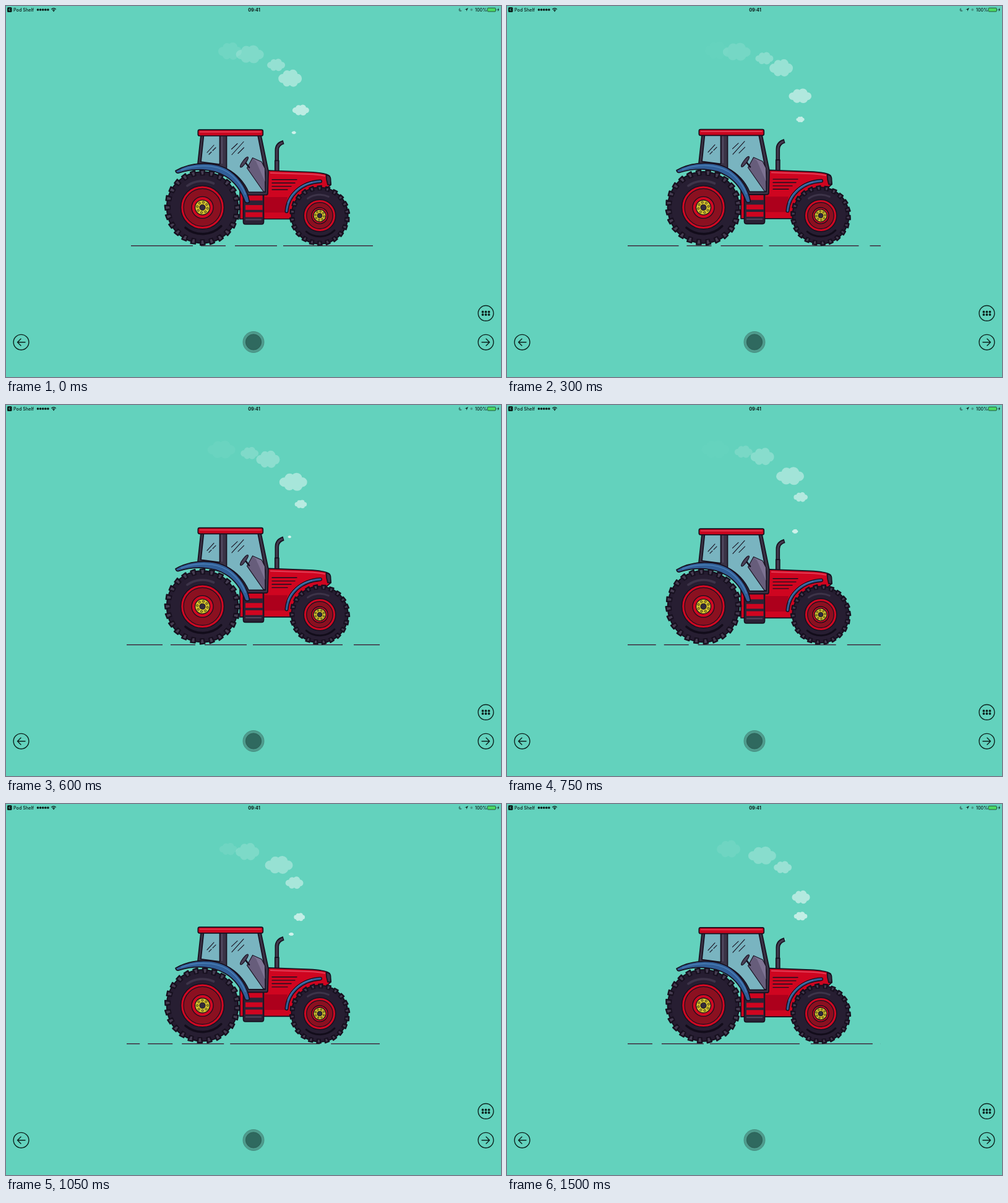
Write an HTML page that moves like this. It is 800x600 px and loops after 1.55 s.

```html
<!DOCTYPE html>
<html lang="en">
<head>
<meta charset="utf-8">
<title>Tractor</title>
<style>
  html, body { margin: 0; width: 100%; height: 100%; overflow: hidden; background: #63d2bd; }
  svg { display: block; width: 800px; height: 600px; font: 500 7.2px Inter, Roboto, sans-serif; }
  .ink { stroke: #17101f; stroke-width: 1.7; stroke-linejoin: round; }
  .line { fill: none; stroke: #17101f; stroke-width: 1.4; stroke-linecap: round; stroke-linejoin: round; }
  .thin { stroke-width: 1.1; }
  .button { fill: none; stroke: #0c211d; stroke-width: 1.4; stroke-linecap: round; stroke-linejoin: round; }
</style>
</head>
<body>
<svg viewBox="0 0 800 600">
  <g id="status" fill="#0b1d19">
    <rect x="2" y="2" width="7.5" height="8" rx="1.6"/>
    <path d="M6.6 4L4.6 6L6.6 8" fill="none" stroke="#63d2bd"/>
    <text x="12" y="8.6">Pod Shelf</text>
    <path d="M51.5 6H68.5" stroke="#0b1d19" stroke-width="3.7" stroke-linecap="round" stroke-dasharray="0 4.1"/>
    <path d="M73.2 5.4Q77 1.9 80.8 5.4M74.9 7Q77 5.1 79.1 7" fill="none" stroke="#0b1d19" stroke-width="1.2"/>
    <circle cx="77" cy="8.2" r="1"/>
    <text x="401" y="8.7" text-anchor="middle" font-weight="700">09:41</text>
    <path d="M734 3.3A2.9 2.9 0 1 0 737 7.5A3.2 3.2 0 0 1 734 3.3Z" fill="#3f8175"/>
    <path d="M747 3L741.4 5.8H744.1V8.8Z"/>
    <circle cx="752.3" cy="6" r="1.9" fill="#4a9889"/>
    <text x="758" y="8.6">100%</text>
    <rect x="778" y="3.2" width="13.4" height="5.8" rx="1.2" fill="#4cd964" stroke="#0b1d19" stroke-width=".7"/>
    <path d="M792.1 5V7.3Q793.2 6.1 792.1 5ZM796.4 2.8L793.9 6.5H795.4L794.6 9.2L797.2 5.5H795.7Z"/>
  </g>

  <g class="button">
    <circle cx="24.5" cy="543.8" r="12.4"/>
    <path d="M31 543.8H18.5M24 538.3L18.5 543.8L24 549.3"/>
    <circle cx="775.5" cy="543.8" r="12.4"/>
    <path d="M769 543.8H781.5M776 538.3L781.5 543.8L776 549.3"/>
    <circle cx="775.5" cy="496.9" r="12.4"/>
    <path d="M770.5 494.7H781M770.5 499.2H781" stroke-width="3.8" stroke-dasharray="0 5"/>
  </g>
  <circle cx="400" cy="543.5" r="17" fill="#4f9b8d" stroke="#478f81"/>
  <circle cx="400" cy="543.5" r="12.6" fill="#2f695f" stroke="#28594f" stroke-width=".8"/>

  <path id="ground" d="M195 387.7H604" stroke="#402c3e" stroke-width="1.4" stroke-dasharray="100 13 40 15 68 10 145 18"/>
  <path id="trail" d="M449 219C466 213 476 187 476.5 165C477 140 461 112 437 95.5C412 78 372 72 335 71.5" fill="none"/>
  <g id="smoke" fill="#fff"></g>

  <g id="body">
    <g id="pipe">
      <path d="M437.8 252V233Q437.8 223.5 448.6 220.2" fill="none" stroke="#17101f" stroke-width="6.6"/>
      <path d="M437.8 252V233Q437.8 223.8 447.4 220.8" fill="none" stroke="#443c50" stroke-width="3.2"/>
      <rect class="ink" x="434.8" y="250" width="6" height="18" fill="#443c50"/>
    </g>
    <path class="ink" d="M378 296L424 266L490 268.5Q519 270 523 275L525 289L462 344.5H378Z" fill="#cf0520"/>
    <path d="M418 309H455L452 334H418Z" fill="#ad001c"/>
    <path d="M427 270L490 272Q509 273 516 275" fill="none" stroke="#e23c55" stroke-width="2"/>
    <path class="ink" d="M517.5 273.5Q524 274 524.5 279L525 289H520Q517.5 281 517.5 273.5Z" fill="#3a3346"/>
    <path class="line" d="M430 280.8H470M430 286.2H467M430 291.6H461M430 297H455"/>

    <path class="ink" d="M315 209H412L424 267L423 303Q423 305.5 420 305.5H388L350 262L310 255Z" fill="#3a3346"/>
    <path class="ink" d="M319.5 209H345.5V256L315 252Z" fill="#79b4c0"/>
    <path class="ink" d="M356.5 209H407L419 270V301H392Q381 276 356.5 263Z" fill="#79b4c0"/>
    <path d="M349 211V255" stroke="#514960" stroke-width="2.4"/>
    <path class="ink thin" d="M389.5 262L398.5 245.5L413 252L418.5 263L419 300H416Z" fill="#675d7b"/>
    <path d="M399 246.5L412.5 252.5L418 263L418.5 284L404 251Z" fill="#7d7292"/>
    <path class="line" d="M386 252L393 261" style="stroke-width:2.6"/>
    <ellipse class="ink thin" cx="385" cy="252.5" rx="10.2" ry="2.6" transform="rotate(-54 385 252.5)" fill="#4b4259"/>
    <path class="line thin" d="M325 237L336 225M328 240L332 236M334 234L339 229M364.5 231.5L374 222.5M365 240.5L384 219.5M375 238.5L384.5 229"/>
    <rect class="ink" x="310.3" y="200.2" width="105" height="9.8" rx="2.6" fill="#c9061f"/>
    <path d="M313 203.6H412.5" stroke="#e5405a" stroke-width="1.7"/>

    <path class="ink" d="M383.5 306H416.5V349Q416.5 353 413 353H387Q383.5 353 383.5 349Z" fill="#2b2336"/>
    <path d="M387 310.5H414.5M387 325.8H414.5M387 337.5H414.5" stroke="#cf0520" stroke-width="7.8"/>
    <path d="M387 345.5H413" stroke="#50475e" stroke-width="2"/>
    <path d="M453.5 332C455.5 306 477 285.5 508 283.5" fill="none" stroke="#17101f" stroke-width="6" stroke-linecap="round"/>
    <path d="M453.5 332C455.5 306 477 285.5 508 283.5" fill="none" stroke="#335f97" stroke-width="3.2" stroke-linecap="round"/>
    <path d="M455 319C460 303 475 289 495 285" fill="none" stroke="#5388ba" stroke-width="1"/>
  </g>
  <g id="wheels"></g>
  <g id="fender">
    <path class="ink" d="M274 266.5C300 251.3 340 250.3 362.5 267C382 282 390.5 300 393.5 317Q390 320 386.5 317C380 299 371 285 355 275.5C334 262.5 304 262 279 270Q275 271 274 266.5Z" fill="#315f98"/>
    <path d="M283 265.5C307 255.8 338 256 358 268.5C373 279 382 291 387 305" fill="none" stroke="#4c82b8" stroke-width="1.4"/>
  </g>
</svg>
<script>
const LOOP = 1550, STEP = 50;
const SCROLL_SPEED = 0.0817, SMOKE_SPEED = 0.0775; // px per ms
const INK = '#17101f';
const $ = id => document.getElementById(id);

function add(parent, tag, attrs) {
  const node = document.createElementNS(parent.namespaceURI, tag);
  for (const key in attrs) node.setAttribute(key, attrs[key]);
  return parent.appendChild(node);
}

function addWheel(cx, cy, size, lugs, rims) {
  const wheel = add($('wheels'), 'g', { transform: `translate(${cx} ${cy})` });
  const disc = (parent, r, fill, width = 1.6) =>
    add(parent, 'circle', { r, fill, stroke: INK, 'stroke-width': width });
  const arc = (r, from, to, stroke, width) => {
    const at = deg => [r * Math.cos(deg * Math.PI / 180), r * Math.sin(deg * Math.PI / 180)];
    add(wheel, 'path', { d: `M${at(from)}A${r} ${r} 0 0 1 ${at(to)}`,
      fill: 'none', stroke, 'stroke-width': width, 'stroke-linecap': 'round' });
  };

  const tread = add(wheel, 'g');
  disc(tread, size * 0.93, '#251c30', 2);
  const half = Math.PI * size / lugs * 0.5;
  for (let i = 0; i < lugs; i++) {
    add(tread, 'path', {
      fill: '#463d52', stroke: INK, 'stroke-width': 2.4, 'stroke-linejoin': 'round',
      transform: `rotate(${i * 360 / lugs})`,
      d: `M${-half * 0.5} ${-size * 0.83}L${-half} ${-size * 0.965}L${half * 0.8} ${-size * 0.98}L${half * 0.7} ${-size * 0.85}Z`
    });
  }
  disc(wheel, size * 0.83, '#271e32', 0);
  arc(size * 0.69, -125, -65, '#3d3449', size * 0.06);
  arc(size * 0.69, 45, 130, '#120c1a', size * 0.06);

  disc(wheel, rims[0], '#d00822');
  disc(wheel, rims[1], '#8b1020', 1.2);
  disc(wheel, rims[2], '#d00822', 1.3);
  const hub = add(wheel, 'g');
  disc(hub, rims[3], '#d6c52d', 1.3);
  for (let i = 0; i < 8; i++) {
    add(hub, 'circle', { cy: -rims[3] * 0.7, r: rims[3] * 0.14, fill: '#b5a62b',
      stroke: '#2b2418', 'stroke-width': 0.7, transform: `rotate(${i * 45 + 10})` });
  }
  disc(hub, rims[3] * 0.38, '#332b3c', 1);
  return { size, spinning: [tread, hub] };
}

const wheels = [
  addWheel(317.5, 325.8, 62, 24, [35, 30.5, 17.5, 12]),
  addWheel(507, 339, 49, 22, [25.8, 21.3, 13, 10])
];

// Unit cloud, one wide and one high, made of overlapping lobes.
const lobe = (x, y, rx, ry) => `M${x - rx} ${y}a${rx} ${ry} 0 1 1 ${2 * rx} 0a${rx} ${ry} 0 1 1 ${-2 * rx} 0`;
const cloud = [
  [-.32, .02, .18, .26], [.32, .02, .18, .27], [-.13, -.18, .18, .28], [.12, -.2, .2, .3],
  [-.14, .2, .18, .28], [.14, .2, .2, .3], [0, 0, .34, .34]
].map(l => lobe(...l)).join('');

const sizes = [[29, 20], [45, 29], [38, 28]];
const puffs = [-113, -66.5, -35.5, 22, 60.5, 116, 147.4, 193.4, 226].map((start, i) => ({
  start,
  size: sizes[i % 3],
  node: add($('smoke'), 'path', { d: cloud })
}));

function drawPuff({ start, size, node }, time) {
  const along = start + SMOKE_SPEED * time;
  const visible = along > -2 && along < 255;
  node.setAttribute('opacity', visible ? Math.min(0.75, 0.75 * (1 - along / 255)) : 0);
  if (!visible) return;
  const { x, y } = $('trail').getPointAtLength(Math.max(0, along));
  const grow = Math.min(1, (along + 5) / 109);
  node.setAttribute('transform', `translate(${x} ${y}) scale(${size[0] * grow} ${size[1] * grow})`);
}

function draw(t) {
  const time = t - 0.12 * Math.max(0, t - 1250); // slight slowdown before the loop
  const travel = SCROLL_SPEED * time;
  const lift = (1 - Math.cos(2 * Math.PI * t / 390)) / 2;

  $('ground').setAttribute('stroke-dashoffset', 402 + travel);
  for (const id of ['body', 'fender']) $(id).setAttribute('transform', `translate(0 ${-1.6 * lift})`);
  $('pipe').setAttribute('transform', `translate(0 267) scale(1 ${1 + 0.06 * lift}) translate(0 -267)`);
  for (const { size, spinning } of wheels) {
    const turn = travel / size * 180 / Math.PI;
    for (const part of spinning) part.setAttribute('transform', `rotate(${turn})`);
  }
  for (const puff of puffs) drawPuff(puff, time);
}

const begin = performance.now();
function tick() {
  const t = (performance.now() - begin) % LOOP;
  draw(Math.floor(t / STEP) * STEP);
  requestAnimationFrame(tick);
}
tick();
</script>
</body>
</html>
```
